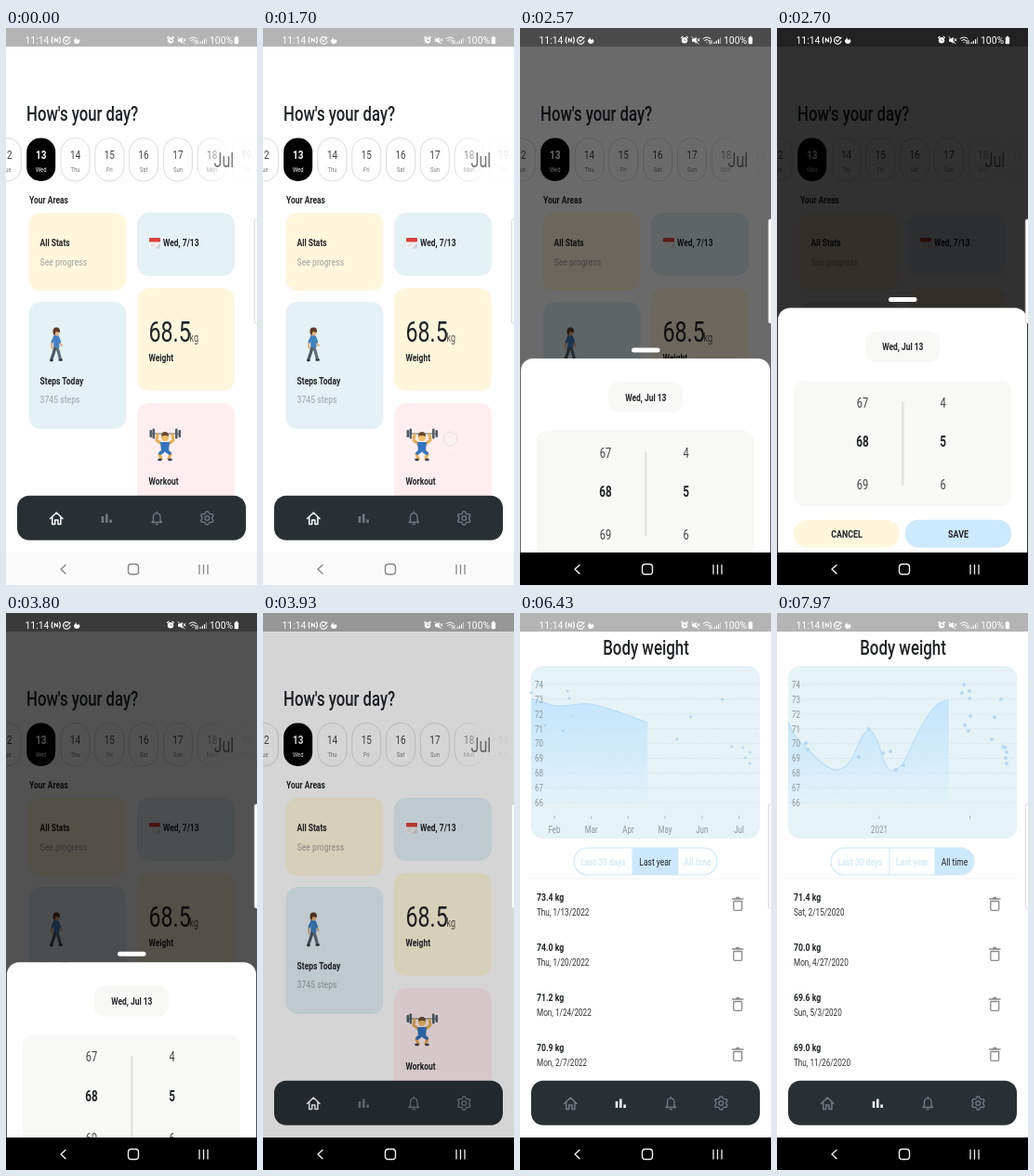
These frames come from a looping animation (270x600 px, 8 s). An HTML page:

```html
<!DOCTYPE html>
<html lang="en">
<head>
<meta charset="utf-8">
<title>Body weight tracker</title>
<style>
html, body { margin: 0; width: 100%; height: 100%; overflow: hidden; background: #fff; }
svg { display: block; width: 270px; height: 600px; }
text { font-family: Roboto, "Open Sans", sans-serif; }
</style>
</head>
<body>
<svg id="stage" viewBox="0 0 270 600" xmlns="http://www.w3.org/2000/svg"></svg>
<script>
const LOOP = 8000, INK = '#202326', MUTED = '#b3b1aa', YELLOW = '#fff6dc', BLUE = '#e4f1f5', SEMI = 600;
const NARROW = 0.75; // the interface uses a condensed face
const clamp = (v, a = 0, b = 1) => Math.min(b, Math.max(a, v));
const ramp = (t, a, b) => clamp((t - a) / (b - a));
const mix = (a, b, u) => a + (b - a) * u;

const label = (x, y, s, size, fill = INK, weight = 400, anchor = 'start') =>
  `<text transform="translate(${x} ${y}) scale(${NARROW} 1)" font-size="${size}" fill="${fill}" font-weight="${weight}" text-anchor="${anchor}">${s}</text>`;
const mid = (x, y, s, size, fill, weight) => label(x, y, s, size, fill, weight, 'middle');
const box = (x, y, w, h, r, fill, more = '') =>
  `<rect x="${x}" y="${y}" width="${w}" height="${h}" rx="${r}" fill="${fill}" ${more}/>`;
const dot = (x, y, r, fill, more = '') => `<circle cx="${x}" cy="${y}" r="${r}" fill="${fill}" ${more}/>`;
const line = (d, color, w = 1, more = '') =>
  `<path d="${d}" fill="none" stroke="${color}" stroke-width="${w}" stroke-linecap="round" stroke-linejoin="round" ${more}/>`;
const group = (id, body, more = '') => `<g id="${id}" ${more}>${body}</g>`;

function smooth(p) {
  let d = `M${p[0]}`;
  for (let i = 0; i < p.length - 1; i++) {
    const a = p[i - 1] || p[i], b = p[i], c = p[i + 1], e = p[i + 2] || c;
    d += `C${[0, 1].map(k => b[k] + (c[k] - a[k]) / 6)} ${[0, 1].map(k => c[k] - (e[k] - b[k]) / 6)} ${c}`;
  }
  return d;
}

function gear(x, y) {
  const pts = [];
  for (let i = 0; i < 24; i++) {
    const a = (i - 0.5) * Math.PI / 12, r = i % 4 < 2 ? 7.3 : 5.4;
    pts.push([x + r * Math.sin(a), y - r * Math.cos(a)].map(n => n.toFixed(1)));
  }
  return line('M' + pts.join('L') + 'Z', 'currentColor', 1.3) + dot(x, y, 2.4, 'none', 'stroke="currentColor" stroke-width="1.3"');
}

// ---- home ----
function dayStrip() {
  const names = ['Tue', 'Wed', 'Thu', 'Fri', 'Sat', 'Sun', 'Mon', 'Tue'];
  return names.map((name, i) => {
    const x = 0.9 + i * 36.8, on = i === 1;
    return box(x - 15.5, 118.5, 31, 46.5, 15, on ? '#000' : '#fefefe', on ? '' : 'stroke="#d9d9d9" stroke-width=".9"') +
      mid(x, 141, 12 + i, 13.3, on ? '#fff' : '#444', on ? SEMI : 400) +
      mid(x, 154.5, name, 7.8, on ? '#fff' : '#7c7c7c');
  }).join('') + box(202, 116, 68, 51, 0, 'url(#fade)') + label(223.5, 150, 'Jul', 21.5, '#777');
}

const calendar = box(154, 226, 12, 11.5, 1, '#f4f4f2') + box(154, 226, 12, 4.5, 1, '#d8433c') +
  '<path d="M166 231v6.5h-6z" fill="#cfd6da"/>' + line('M156 233h5M156 235h3', '#c3c9cc', .7);

const walker = '<g transform="translate(11.5 0) scale(.78 1)">' +
  line('M54 342L51 350L48 357', '#4d5a66', 4) + line('M55 342L58 350L60 356', '#5f6e7c', 4) +
  line('M47 358l2 0M59 357.5l3 0', '#2f3437', 2.6) +
  line('M52 334L48 341L49 345', '#e3a878', 2.4) + line('M57 334L60 340L62 342', '#e3a878', 2.4) +
  '<path d="M51 331q4-2 7 1l1 12h-8z" fill="#3f82c4"/>' +
  line('M52 333l-3 5M57 333l2.5 5', '#3f82c4', 3) +
  dot(55, 327.5, 4, '#e8b184') + '<path d="M59.5 328q1-5.500-4.500-5.500q-5 0-5 4q0 4 2.500 4.500l1.500-4z" fill="#5d3a26"/></g>';

const lifter =
  line('M157 437H186', '#8b959b', 1.4) +
  [[154.5, 433, 8], [157.5, 431.5, 11], [182, 431.5, 11], [185.5, 433, 8]].map(([x, y, h]) => box(x, y, 2.6, h, 1, '#4f5d66')).join('') +
  line('M167 448L162 444L163 438M175 448L180 444L179 438', '#e8ad50', 3) +
  line('M169 455L165 459L167 464M173 455L177 459L175 464', '#e8ad50', 3.2) +
  '<path d="M166 446h10l-1 10h-8z" fill="#3374c2"/>' + line('M169 456l-3 2M173 456l3 2', '#3374c2', 3.6) +
  line('M164.5 465h2M175.5 465h2', '#37424a', 2.4) +
  dot(171, 441, 4, '#f2be66') + '<path d="M167 440q0-5 4-5t4 5q-4-2-8 0z" fill="#6d4a2d"/>';

const home =
  label(22, 99.5, 'How\'s your day?', 22.3, INK, 500) + dayStrip() +
  label(25, 189, 'Your Areas', 11.3, INK, SEMI) +
  box(24.5, 199, 105, 84, 13, YELLOW) + label(36.5, 235, 'All Stats', 11.3, INK, SEMI) + label(36.5, 255.5, 'See progress', 11.5, MUTED, 500) +
  box(141, 199, 105, 68, 13, BLUE) + calendar + label(169, 235, 'Wed, 7/13', 11.3, INK, SEMI) +
  box(24.5, 295, 105, 137, 13, BLUE) + walker + label(36.5, 383.7, 'Steps Today', 11.4, INK, SEMI) + label(36.5, 404, '3745 steps', 11.5, '#a9b1b5', 500) +
  box(141, 280, 105, 111, 13, YELLOW) + label(153.5, 337.5, '68.5', 31, INK, 400) + label(197.5, 337.5, 'kg', 12, '#55534d') + label(153.5, 359, 'Weight', 11.3, INK, SEMI) +
  box(141, 404, 105, 137, 13, '#ffeef0') + lifter + label(153.5, 491.7, 'Workout', 11.3, INK, SEMI);

// ---- statistics ----
const day = (n, kg) => [12 + n * 10.75, 81 + (73 - kg) * 19.8];
const month = [[0, 72.9], [6, 69.7], [7, 69.4], [13, 69.5], [15, 69.75], [16, 69.05], [17, 69.05], [19.6, 69.05], [21.2, 69.85], [22, 68.5]].map(p => day(...p));
const recent = [[199, 86], [201, 77], [202, 121], [206, 127], [207, 84], [207.4, 92], [208, 111], [231, 136], [234, 112], [241, 93], [243, 144], [245.5, 145], [247, 150], [246, 156], [247, 162]];
const early = [[31, 140], [33, 147], [88, 155], [99, 125], [114, 151], [122, 149], [128, 169], [136, 164]];

const views = [
  { top: 73, rows: 7, y: 81, step: 19.8, start: 4736, dots: month,
    ticks: ['23', '25', '27', '29', 'Jul 1', '3', '5', '7', '9', '11'].map((s, i) => [34 + i * 21.4, s]).concat([[248, '']]),
    curve: [[12, 82], [30, 94], [56, 122], [84, 149], [108, 157], [135, 153], [162, 149], [190, 156], [220, 158], [248, 163]],
    list: ['72.9', 'Tue, 6/21', '69.7', 'Mon, 6/27', '69.4', 'Tue, 6/28', '69.5', 'Mon, 7/4'] },
  { top: 74, rows: 9, y: 77, step: 15.9, start: 6082, dots: recent.map(([x, y]) => [12 + (x - 199) * 4.9, y]),
    ticks: ['Feb', 'Mar', 'Apr', 'May', 'Jun', 'Jul'].map((s, i) => [37 + i * 39.7, s]),
    curve: [[12, 92], [40, 100], [75, 98], [110, 108], [150, 122], [185, 127], [215, 131], [248, 158]],
    list: ['73.4', 'Thu, 1/13/2022', '74.0', 'Thu, 1/20/2022', '71.2', 'Mon, 1/24/2022', '70.9', 'Mon, 2/7/2022'] },
  { top: 74, rows: 9, y: 77, step: 15.9, start: 7457, dots: early.concat(recent),
    ticks: [[110, '2021'], [207.5, '']],
    curve: [[12, 117], [20, 133], [33, 147], [50, 163], [66, 169], [80, 158], [90, 136], [99, 126], [108, 138], [116, 162], [124, 170], [136, 161], [152, 128], [168, 103], [182, 94], [200, 99], [222, 122], [248, 155]],
    list: ['71.4', 'Sat, 2/15/2020', '70.0', 'Mon, 4/27/2020', '69.6', 'Sun, 5/3/2020', '69.0', 'Thu, 11/26/2020'] }
];

const tabs = [[58, 63, 'Last 30 days'], [121, 49, 'Last year'], [170, 42, 'All time']];
const trash = y => line(`M228.5 ${y - 5}h11.5M232 ${y - 5}l1-1.5h2.5l1 1.5M229.8 ${y - 2.5}v8.5q0 1.3 1.3 1.3h6.3q1.3 0 1.3-1.3v-8.5z`, '#8b8b8b', 1.3);

function view(v, i) {
  const path = smooth(v.curve), base = v.y + (v.rows - 1) * v.step + 1;
  let s = `<g clip-path="url(#reveal)"><path d="${path}V${base}H12Z" fill="url(#area)"/>${line(path, '#b7dcf8', 1.1)}</g>`;
  for (let k = 0; k < v.rows; k++) {
    const y = v.y + k * v.step;
    s += line(`M12 ${y}H258`, '#cfe1e9', .6, 'stroke-dasharray="3 2" opacity=".8"') + label(16, y + 3.8, v.top - k, 10.6, '#8a979c');
  }
  v.ticks.forEach(([x, n]) => s += line(`M${x} 219v2.5`, '#9dabb0', .8) + mid(x, 236.5, n, 10.6, '#8a979c'));
  s += group('dots' + i, v.dots.map(([x, y]) => dot(x, y, 2, '#b5d9f4')).join(''));
  s += '<g clip-path="url(#pill)">' + box(tabs[i][0], 253, tabs[i][1], 29, 0, '#cce8fd') + '</g>';
  tabs.forEach(([x, w, n], k) => s += mid(x + w / 2, 271.5, n, 11.3, k === i ? INK : '#d8ebf9', k === i ? 400 : SEMI));
  for (let k = 0; k < 4; k++) {
    const y = 306 + k * 54;
    s += label(18, y + 4, v.list[2 * k] + ' kg', 11.6, INK, 700) + label(18, y + 19.5, v.list[2 * k + 1], 10.9, '#333') + trash(y + 7);
  }
  return group('view' + i, s);
}

const stats = box(0, 20, 270, 545, 0, '#fefefe') + mid(135.5, 44.5, 'Body weight', 22.5, INK, 500) +
  box(12, 57, 246, 186, 13, '#e5f2f6') + views.map(view).join('') +
  box(58, 253, 154, 29, 14.5, 'none', 'stroke="#d2eafb" stroke-width="1.2"') +
  line('M121 253v29M170 253v29', '#d2eafb', 1.1) + line('M9 286H258', '#f0f0f0', .8);

// ---- chrome ----
const tabBar = box(12, 503.8, 246, 48, 13, '#283034') +
  group('homeIcon', line('M47.5 528.5L54.3 522L61 528.5M49.7 527v7.5h3v-4.5h3.2v4.5h3V527', 'currentColor', 1.5)) +
  group('statIcon', line('M104 526v7M108.3 523.5v9.5M112.6 529.5v3.5', 'currentColor', 2.5, 'style="stroke-linecap:butt"')) +
  group('restIcons', line('M157 532.5h10.5l-1.5-2v-3.5q0-4-3.7-4.3q-3.8.3-3.8 4.3v3.5zM161.3 534.7h2M162.3 522v-.8', 'currentColor', 1.3) +
    gear(216.3, 528), 'color="#737b80"');

const status = '<g fill="#fff" font-size="10.4"><text x="20.5" y="16.5">11:14</text><text x="219" y="16.5">100%</text></g>' +
  line('M50 9.8q-1.800 3.200 0 6.400M57.5 9.800q1.800 3.200 0 6.400M52.3 15v-4l3 4v-4', '#fff', 1.1) +
  line('M68.5 11.5A3.8 3.8 0 1 0 69 14M63.5 12.8l1.7 1.7l4-4.5', '#fff', 1.1) +
  '<path d="M75 9.5q.5 3 2 3.5q1-.8 1-1.5q2 2 1 4q-1.5 2-4 1.2q-2.5-1-2-3.7q2-.5 2-3.5z" fill="#fff"/>' +
  dot(177, 13.3, 3.2, '#fff') + line('M173.5 10.5l1.5-1.3M180.5 10.5l-1.5-1.3', '#fff', 1.1) + line('M177 11.8v1.7h1.3', '#888', .8) +
  '<path d="M185 11.8h2l2.7-2v7l-2.7-2h-2z" fill="#fff"/>' + line('M185 9.5l7 7.5M191 11.5l2 2.5M193 11.5l-2 2.5', '#fff', .9) +
  line('M197 11.5q4-3.2 8 0M198.7 13.3q2.3-1.7 4.6 0M201 15.5h.1M204 13.5v3.5M206 13.5v3.5', '#fff', 1) +
  line('M209 16.5v-1M211.3 16.5v-2.5M213.6 16.5v-4', '#fff', 1.2) + line('M215.6 16.5v-6', '#fff', 1, 'opacity=".5"') +
  box(245.7, 9.8, 4.4, 7.4, 1, '#fff') + box(246.9, 8.8, 2, 1.5, .4, '#fff');

const nav = group('navFill', box(0, 565, 270, 35, 0, 'currentColor')) +
  group('navIcons', line('M64 578.5L59 583L64 587.8', 'currentColor', 1.4) +
    box(131.5, 577.5, 11, 11, 3.3, 'none', 'stroke="currentColor" stroke-width="1.4"') +
    line('M208 578.5v9.5M212.5 578.5v9.5M217 578.5v9.5', 'currentColor', 1.3));

const picker = (x, nums) => nums.map((n, i) =>
  mid(x, [408.7, 451, 496.7][i], n, i === 1 ? 15.6 : 14.8, i === 1 ? INK : '#444', i === 1 ? 700 : 400)).join('');
const sheet = box(120, 290, 30.5, 5, 2.5, '#fff') + box(1, 301.5, 268, 300, 13, '#fff') +
  box(95, 326.7, 80, 33, 11, '#f8f8f7') + mid(135.3, 347.3, 'Wed, Jul 13', 11.3, INK, SEMI) +
  box(18, 379.7, 234, 135, 11, '#f8f8f7') + box(134, 402, 2.6, 91, 1.3, '#e2e2e1') +
  picker(92, [67, 68, 69]) + picker(178.5, [4, 5, 6]) +
  box(18, 529.7, 114, 30, 14, YELLOW) + mid(75, 549.3, 'CANCEL', 11.8, INK, SEMI) +
  box(138, 529.7, 114, 30, 14, '#cce9ff') + mid(195, 549.3, 'SAVE', 11.8, INK, SEMI);

const svg = document.getElementById('stage');
svg.innerHTML = `<defs>
  <linearGradient id="fade"><stop offset="0" stop-color="#fefefe" stop-opacity="0"/><stop offset=".5" stop-color="#fefefe" stop-opacity=".8"/><stop offset="1" stop-color="#fefefe" stop-opacity=".95"/></linearGradient>
  <linearGradient id="area" gradientUnits="userSpaceOnUse" x1="0" y1="80" x2="0" y2="206"><stop offset="0" stop-color="#c4e5fd"/><stop offset=".5" stop-color="#cfeafb"/><stop offset="1" stop-color="#e2f2f9"/></linearGradient>
  <clipPath id="reveal"><rect id="cut" x="12" y="57" width="0" height="186"/></clipPath>
  <clipPath id="pill"><rect x="58" y="253" width="154" height="29" rx="14.5"/></clipPath></defs>` +
  box(0, 0, 270, 600, 0, '#fefefe') + box(0, 0, 270, 20, 0, '#b4b4b4') +
  group('home', home) + group('stats', stats) + tabBar +
  box(0, 0, 270, 600, 0, '#000', 'id="shade"') + group('sheet', sheet) + status + nav +
  box(267.3, 206, 6, 112, 2, '#fff', 'stroke="#cfcfcf" stroke-width=".8"') +
  group('touch', dot(0, 0, 14, '#fff', 'opacity=".12"') + dot(0, 0, 7.5, '#f1f1ec', 'stroke="#bdbdb8" stroke-width=".8" opacity=".62"'));

const el = {};
svg.querySelectorAll('[id]').forEach(n => el[n.id] = n);
const set = (id, name, v) => el[id].setAttribute(name, v);
const show = (id, on) => set(id, 'display', on ? 'inline' : 'none');

const taps = [[1690, 1890, 201.5, 442.5], [2330, 2530, 203.3, 361.5], [3530, 3690, 195, 545], [4370, 4530, 108, 528], [5800, 5960, 145, 268], [7130, 7290, 190, 268]];

function draw(t) {
  const shade = t < 3200
    ? (t < 2470 ? 0.21 * ramp(t, 2360, 2470) : mix(0.21, 0.82, 1 - (1 - ramp(t, 2470, 2740)) ** 2))
    : (t < 3800 ? mix(0.82, 0.68, ramp(t, 3690, 3800) ** 1.5)
      : t < 3930 ? mix(0.68, 0.16, ramp(t, 3800, 3930)) : 0.16 * (1 - ramp(t, 3930, 4080)));
  set('shade', 'opacity', shade);

  const drop = t < 3200 ? 275 * (1 - ramp(t, 2475, 2705)) ** 3
    : t < 3800 ? 73 * ramp(t, 3690, 3800) ** 1.6 : mix(73, 280, ramp(t, 3800, 3920));
  show('sheet', t > 2475 && t < 3920);
  set('sheet', 'transform', `translate(0 ${drop})`);

  const dark = t >= 2510;
  set('navFill', 'color', dark ? '#000' : '#fafafa');
  set('navIcons', 'color', dark ? '#f2f2f2' : '#858585');

  const onStats = t >= 4480;
  set('homeIcon', 'color', onStats ? '#737b80' : '#fff');
  set('statIcon', 'color', onStats ? '#fff' : '#737b80');
  show('stats', onStats);
  set('stats', 'opacity', ramp(t, 4480, 4680));

  const cur = t < 5930 ? 0 : t < 7290 ? 1 : 2;
  const u = ramp(t, views[cur].start, views[cur].start + 885);
  set('cut', 'width', 237 * (1 - (1 - u) ** 1.5));
  views.forEach((v, i) => show('view' + i, i === cur));
  const r = 2 * clamp(u * 1.9);
  for (const c of el['dots' + cur].children) c.setAttribute('r', r);

  const tap = taps.find(p => t >= p[0] && t < p[1]);
  show('touch', tap);
  if (tap) {
    set('touch', 'transform', `translate(${tap[2]} ${tap[3]})`);
    set('touch', 'opacity', Math.min(ramp(t, tap[0] - 30, tap[0] + 30), 1 - ramp(t, tap[1] - 50, tap[1])));
  }
}

const begin = performance.now();
function tick() {
  draw((performance.now() - begin) % LOOP);
  requestAnimationFrame(tick);
}
tick();
</script>
</body>
</html>
```
